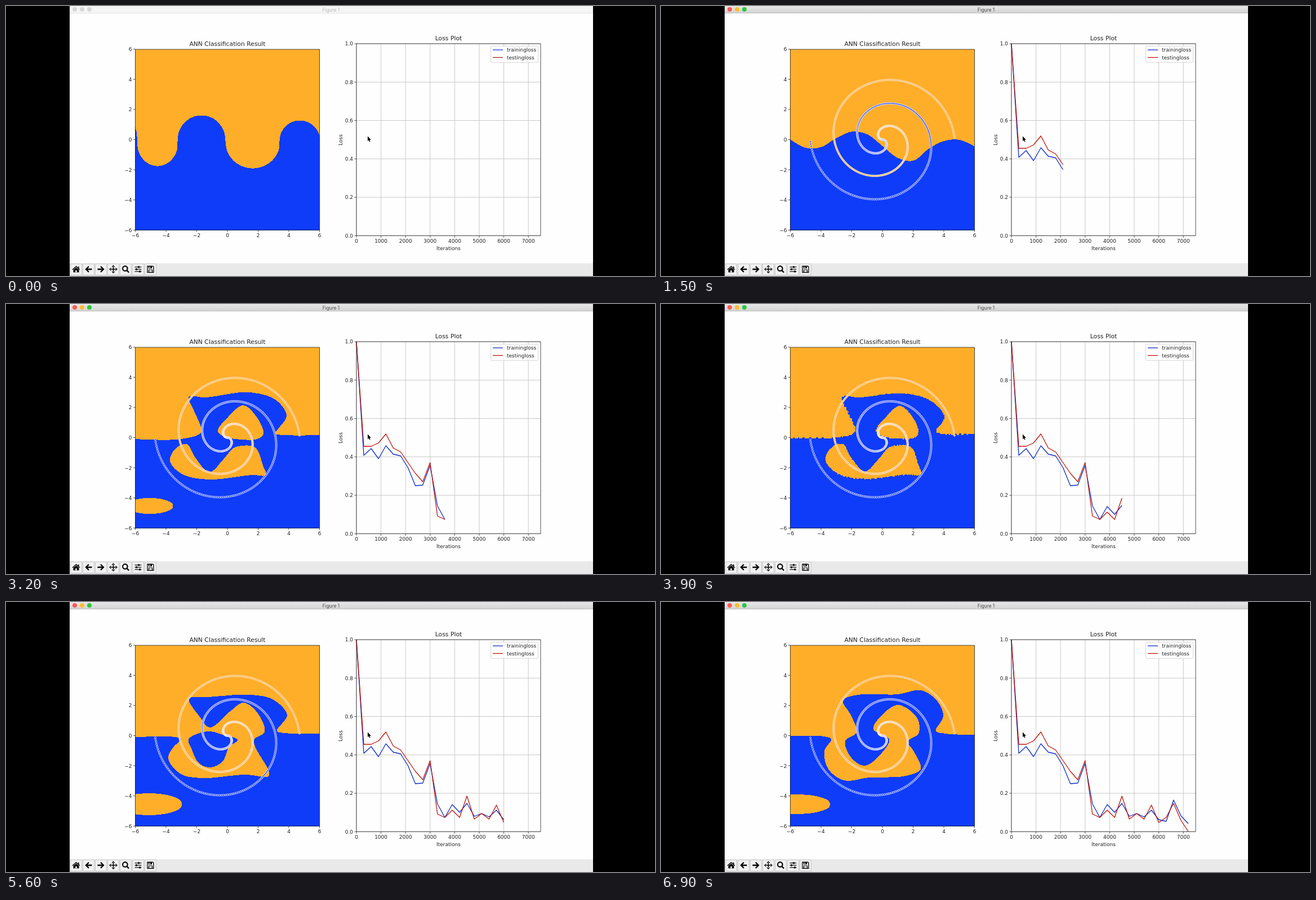
An HTML page with a canvas for the animation above (7000 ms loop, 1152 by 480 pixels).

```html
<!DOCTYPE html>
<html>
<head>
<meta charset="utf-8">
<style>
  html, body { margin: 0; width: 100%; height: 100%; overflow: hidden; background: #000; }
  canvas { display: block; }
</style>
</head>
<body>
<canvas id="stage" width="1152" height="480"></canvas>
<script>
const ctx = document.getElementById('stage').getContext('2d');
const LOOP = 7000, BLUE = '#0f3cf9', ORANGE = '#ffae29', INK = '#222';
const MAP = { x: 229, y: 77, w: 328, h: 322 };
const PLOT = { x: 622, y: 67, w: 327, h: 341.3 };
const FONT = '"DejaVu Sans", sans-serif';

// Curve heights on the stage, one entry per 300 iterations
const trainY = [67, 269, 257, 275, 252, 267, 270, 291, 323, 322, 287, 359, 383,
  360, 374, 358, 381, 376, 382, 370, 387, 390, 352, 380, 394];
const testY = [67, 253, 253, 247, 231, 256, 263, 282, 301, 316, 282, 377, 383,
  370, 383, 345, 386, 376, 386, 361, 392, 383, 358, 388, 408];

const pairs = (...flat) => flat.flatMap((x, i) => i % 2 ? [] : [[x, flat[i + 1]]]);

// Centripetal Catmull-Rom curve through a few points
function spline(pts, closed) {
  const n = pts.length, out = [];
  const at = i => closed ? pts[(i + n) % n] : pts[Math.max(0, Math.min(n - 1, i))];
  const gap = (p, q) => Math.sqrt(Math.hypot(p[0] - q[0], p[1] - q[1])) || 1;
  for (let i = 0; i < (closed ? n : n - 1); i++) {
    const [a, b, c, d] = [i - 1, i, i + 1, i + 2].map(at);
    const ab = gap(a, b), bc = gap(b, c), cd = gap(c, d);
    const mix = (u, k) => {
      const m = c[k] - b[k] + bc * ((b[k] - a[k]) / ab - (c[k] - a[k]) / (ab + bc));
      const e = c[k] - b[k] + bc * ((d[k] - c[k]) / cd - (d[k] - b[k]) / (bc + cd));
      const s = c[k] - b[k];
      return b[k] + u * (m + u * (3 * s - 2 * m - e + u * (m + e - 2 * s)));
    };
    for (let j = 0; j < 8; j++) out.push([mix(j / 8, 0), mix(j / 8, 1)]);
  }
  if (!closed) out.push(at(n - 1));
  return out;
}

// Points on an ellipse; dir flips it, span is its share of pi
function arc(cx, cy, rx, ry, dir = 1, span = 1) {
  return Array.from({ length: 11 }, (_, i) => {
    const a = Math.PI * span * i / 11;
    return [cx - rx * Math.cos(a), cy - dir * ry * Math.sin(a)];
  });
}
const ellipse = (cx, cy, rx, ry) => arc(cx, cy, rx, ry, 1, 2);
const wave = (...ys) => ys.map((y, i) => [MAP.x + MAP.w * i / (ys.length - 1), y]);

function makeCanvas(w, h) {
  return Object.assign(document.createElement('canvas'), { width: w, height: h });
}

// Signed distance to the class border, positive in the orange class
function field(border, ...loops) {
  const { w, h } = MAP;
  const g = makeCanvas(w, h).getContext('2d', { willReadFrequently: true });
  const curves = [spline(border), ...loops.map(l => spline(l, true))]
    .map(pts => pts.map(([x, y]) => [x - MAP.x, y - MAP.y]));
  g.beginPath();
  curves.forEach((pts, i) => {
    pts.forEach(([x, y], j) => j ? g.lineTo(x, y) : g.moveTo(x, y));
    if (!i) { g.lineTo(w + 9, -9); g.lineTo(-9, -9); }
    g.closePath();
  });
  g.fill('evenodd');
  const alpha = g.getImageData(0, 0, w, h).data;
  const pts = curves.flat(), values = new Float32Array(w * h);
  for (let y = 0; y < h; y += 2) for (let x = 0; x < w; x += 2) {
    let best = 1e9;
    for (let i = 0; i < pts.length; i++) {
      const dx = pts[i][0] - x, dy = pts[i][1] - y, d = dx * dx + dy * dy;
      if (d < best) best = d;
    }
    const dist = Math.sqrt(best) + 0.5, p = y * w + x;
    for (const i of [p, p + 1, p + w, p + w + 1])
      values[i] = alpha[4 * i + 3] > 127 ? dist : -dist;
  }
  return values;
}

const bumps = () => field([[229, 213], [232, 226],
  ...arc(269, 244, 36, 40.5, -1), ...arc(347, 238, 42.3, 43.5),
  ...arc(438, 242, 48.3, 46.5, -1), ...arc(521.5, 240, 36, 36.5, 1, 0.95), [557, 234]]);
const highWave = () => field(wave(187, 206, 205, 187, 174.5, 177, 194, 214, 216, 195, 179.5, 177, 187));
const lowWave = () => field(wave(237, 252, 251, 235, 223.5, 228, 249, 270, 275, 254, 240, 238, 250));

const upperLobe = pairs(376,226, 395,200, 421,180, 445,201, 457,231, 446,240, 420,241, 388,236);
const lowerLobe = pairs(291,279, 301,257, 321,249, 336,273, 361,299, 386,276, 406,255,
  442,255, 456,287, 461,304, 436,304, 360,312, 312,302);

const lobes = () => field(
  pairs(229,240, 300,241, 340,233, 347,226, 333,188, 324,165, 355,166, 430,157, 478,170,
    498,198, 483,222, 477,230, 495,233, 557,233),
  upperLobe, lowerLobe, ellipse(255, 359, 42, 14));

const tightLobes = () => field(
  pairs(229,236, 300,236, 337,229, 342,220, 321,174, 318,163, 350,166, 430,159, 478,172,
    504,201, 491,224, 505,229, 557,229),
  upperLobe.map(([x, y]) => [457 - 0.91 * (457 - x), 181 + 0.92 * (y - 180)]),
  lowerLobe.map(([x, y]) => [x + 1, y - 1.5]));

const islandSpiral = () => field(
  pairs(229,240, 300,240, 311,244, 298,257, 288,278, 309,305, 345,313, 425,307, 466,310,
    467,302, 440,246, 459,231, 447,198, 422,179, 397,195, 362,223, 343,203, 325,172,
    360,169, 435,165, 475,174, 499,201, 481,229, 495,233, 557,234),
  pairs(324,244, 358,230, 385,236, 411,245, 396,258, 384,284, 362,294, 342,286, 329,260),
  ellipse(254, 359.5, 59, 19.5));

const fullSpiral = () => field(
  pairs(229,238, 290,239, 302,244, 290,265, 297,297, 325,317, 370,312, 435,309, 461,297,
    449,266, 438,248, 457,234, 455,207, 422,183, 394,199, 377,226, 405,244, 392,268,
    362,291, 338,277, 327,247, 347,232, 337,201, 323,175, 350,165, 420,164, 462,157,
    491,177, 501,203, 488,229, 505,234, 557,236),
  ellipse(241, 359.5, 60, 17.5));

const key = (step, shape) => ({ step, field: shape() });
const keys = [key(0, bumps), key(4, highWave), key(7, lowWave), key(12, lobes),
  key(17, tightLobes), key(20, islandSpiral), key(24, fullSpiral)];

const mapCanvas = makeCanvas(MAP.w, MAP.h), mapCtx = mapCanvas.getContext('2d');

function drawRegions(step) {
  const i = Math.min(keys.length - 2, keys.findLastIndex(k => k.step <= step));
  const a = keys[i], b = keys[i + 1], u = (step - a.step) / (b.step - a.step);
  const image = mapCtx.createImageData(MAP.w, MAP.h);
  const pixels = new Uint32Array(image.data.buffer);
  for (let p = 0; p < pixels.length; p++)
    pixels[p] = a.field[p] * (1 - u) + b.field[p] * u > 0 ? 0xff29aeff : 0xfff93c0f;
  mapCtx.putImageData(image, 0, 0);
  ctx.drawImage(mapCanvas, MAP.x, MAP.y);
}

function text(str, x, y, size = 9, align = 'center', color = INK, font = FONT) {
  ctx.font = `${size}px ${font}`;
  ctx.textAlign = align;
  ctx.fillStyle = color;
  ctx.fillText(str, x, y);
}

function line(x1, y1, x2, y2, color = INK, width = 0.8) {
  ctx.strokeStyle = color;
  ctx.lineWidth = width;
  ctx.beginPath();
  ctx.moveTo(x1, y1);
  ctx.lineTo(x2, y2);
  ctx.stroke();
}

function dot(x, y, r, fill) {
  ctx.fillStyle = fill;
  ctx.beginPath();
  ctx.arc(x, y, r, 0, 2 * Math.PI);
  ctx.fill();
}

function box(x, y, w, h, fill, stroke, r = 0, width = 0.8) {
  ctx.beginPath();
  ctx.roundRect(x, y, w, h, r);
  if (fill) { ctx.fillStyle = fill; ctx.fill(); }
  if (stroke) { ctx.strokeStyle = stroke; ctx.lineWidth = width; ctx.stroke(); }
}

function xTick(x, y, label) {
  line(x, y, x, y + 3.5);
  text(label, x, y + 13);
}

function yTick(x, y, label) {
  line(x - 3.5, y, x, y);
  text(label, x - 6, y + 3.4, 9, 'right');
}

function homeIcon() {
  ctx.fill(new Path2D('M0-3L5 1V5.5H-5V1Z'));
  box(-1.3, 2, 2.6, 3.5, '#f1f1f1');
  box(3.3, -5, 1.7, 4, '#000');
  ctx.lineWidth = 1.5;
  ctx.stroke(new Path2D('M-6.5 0.8L0-5L6.5 0.8'));
}

function arrowIcon(dir) {
  ctx.scale(dir, 1);
  ctx.lineWidth = 2.3;
  ctx.stroke(new Path2D('M-6 0H4.5M-0.5-5L4.5 0L-0.5 5'));
}

function moveIcon() {
  const head = new Path2D('M0-0.8H5V0.8H0ZM7.5 0L4-3V3Z');
  for (let i = 0; i < 4; i++) {
    ctx.fill(head);
    ctx.rotate(Math.PI / 2);
  }
}

function zoomIcon() {
  ctx.lineWidth = 2.1;
  ctx.beginPath();
  ctx.arc(-1.1, -1.3, 4.3, 0, 2 * Math.PI);
  ctx.stroke();
  line(2, 2, 5.7, 5.7, '#000', 2.3);
}

function slidersIcon() {
  [1, -3, 3].forEach((x, i) => {
    const y = 4 * i - 4;
    line(-6, y, 6, y, '#000', 1.2);
    box(x - 1.2, y - 1.6, 2.6, 3.2, '#000');
  });
}

function saveIcon() {
  box(-5.5, -5.5, 11, 11, null, '#000', [0, 2, 0, 0], 1.3);
  box(-3, 1, 6, 4.5, null, '#000', 0, 1.2);
  box(-3, -5, 5, 3, null, '#000', 0, 1.2);
  box(0, -5, 2, 3, '#000');
}

const icons = [homeIcon, () => arrowIcon(-1), () => arrowIcon(1), moveIcon, zoomIcon, slidersIcon, saveIcon];

function drawWindow(active) {
  ctx.fillStyle = '#000';
  ctx.fillRect(0, 0, 1152, 480);
  box(113, 0, 929, 480, '#fefefe');
  let bar = '#f6f6f6';
  if (active) {
    bar = ctx.createLinearGradient(0, 0, 0, 13);
    bar.addColorStop(0, '#e8e8e8');
    bar.addColorStop(1, '#d2d2d2');
  }
  box(113, 0, 929, 13, bar);
  line(113, 12.6, 1042, 12.6, active ? '#b8b8b8' : '#dcdcdc');
  ['#fc5b52', '#fdbc2e', '#2bc840'].forEach((c, i) => dot(122 + 13 * i, 6, 4, active ? c : '#d8d8d8'));
  text('Figure 1', 577, 9.6, 8.3, 'center', active ? '#4a4a4a' : '#b4b4b4', 'Inter, sans-serif');
  box(113, 457.5, 929, 22.5, '#e9e9e9');
  icons.forEach((icon, i) => {
    const x = 124.5 + 22 * i;
    box(x - 10, 458.5, 20, 20, '#f1f1f1', '#bdbdbd');
    ctx.save();
    ctx.translate(x, 468);
    ctx.fillStyle = ctx.strokeStyle = '#000';
    icon();
    ctx.restore();
  });
}

function drawSpiral(sign, fill) {
  ctx.lineWidth = 0.85;
  ctx.strokeStyle = '#f6f0f6';
  for (let i = 0; i < 300; i++) {
    const a = 3 * Math.PI * i / 300, r = sign * a / 2;
    dot(393 - 27.25 * r * Math.cos(a), 237.5 - 26.8 * r * Math.sin(a), 1.6, fill);
    ctx.stroke();
  }
}

function drawMap(step) {
  drawRegions(step);
  if (step) {
    drawSpiral(1, ORANGE);
    drawSpiral(-1, BLUE);
  }
  box(229.5, 77, 327, 321.3, null, INK);
  for (let v = -6; v <= 6; v += 2) {
    const label = String(v).replace('-', '\u2212');
    xTick(393 + 27.25 * v, 398.3, label);
    yTick(229.5, 237.5 - 26.8 * v, label);
  }
  text('ANN Classification Result', 393, 71, 10.8);
}

function drawCurve(values, step, color) {
  ctx.strokeStyle = color;
  ctx.lineWidth = 1.3;
  ctx.lineJoin = 'round';
  ctx.beginPath();
  for (let i = 0; i <= step; i++) ctx.lineTo(PLOT.x + 13.08 * i, values[i]);
  ctx.stroke();
  ctx.lineJoin = 'miter';
}

function drawLoss(step) {
  const { x, y, w, h } = PLOT, bottom = y + h;
  const trainColor = step ? '#0b2ccc' : BLUE, testColor = step ? '#c01408' : '#a82a14';
  for (let i = 0; i <= 7; i++) {
    const gx = x + 43.6 * i;
    line(gx, y, gx, bottom, '#bcbcbc');
    xTick(gx, bottom, String(1000 * i));
  }
  for (let i = 0; i <= 5; i++) {
    const gy = bottom - h * i / 5;
    line(x, gy, x + w, gy, '#bcbcbc');
    yTick(x, gy, (i / 5).toFixed(1));
  }
  if (step) {
    drawCurve(trainY, step, trainColor);
    drawCurve(testY, step, testColor);
  }
  box(x, y, w, h, null, INK);
  text('Loss Plot', 785.5, 61, 10.8);
  text('Iterations', 785.5, 434);
  ctx.save();
  ctx.translate(596.5, 238);
  ctx.rotate(-Math.PI / 2);
  text('Loss', 0, 0);
  ctx.restore();
  box(860.5, 71.3, 84, 29, 'rgba(255,255,255,.8)', '#ccc', 2);
  line(864, 78, 882, 78, trainColor, 1.3);
  line(864, 91.5, 882, 91.5, testColor, 1.3);
  text('trainingloss', 889, 81.3, 9, 'left');
  text('testingloss', 889, 94.6, 9, 'left');
}

function drawPointer() {
  const arrow = new Path2D('M642 231.5V240.2L643.9 238.5L645.2 241.5L646.7 240.8L645.4 237.9H648Z');
  ctx.strokeStyle = '#fff';
  ctx.lineWidth = 1.4;
  ctx.stroke(arrow);
  ctx.fillStyle = '#000';
  ctx.fill(arrow);
}

let shown = -1;

function tick() {
  const t = Math.floor((performance.now() % LOOP) / 100) * 100;
  const step = Math.min(24, Math.floor(Math.min(t / 100, 2.4 + t / 307)));
  if (step !== shown) {
    shown = step;
    drawWindow(step > 0);
    drawMap(step);
    drawLoss(step);
    drawPointer();
  }
  requestAnimationFrame(tick);
}

tick();
</script>
</body>
</html>
```
